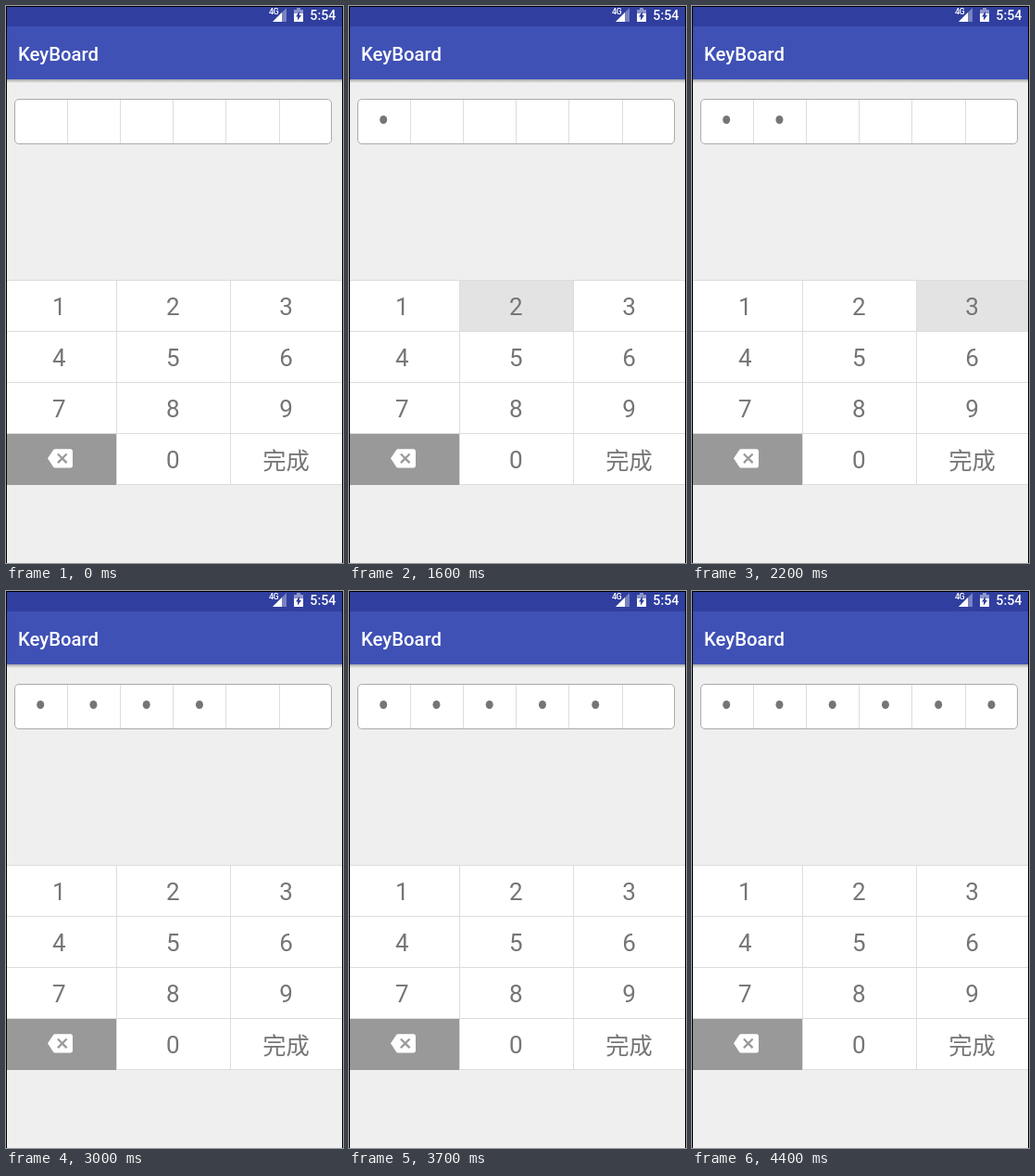
These frames come from a looping animation (364 by 600 pixels, 8000 ms). An HTML page:

```html
<!DOCTYPE html>
<html lang="en">
<head>
<meta charset="utf-8">
<title>Passcode keypad</title>
<style>
html, body { margin: 0; width: 100%; height: 100%; overflow: hidden; background: #efefef; }
svg { display: block; width: 364px; height: 600px; font-family: Roboto, sans-serif; }
.key { font-size: 26px; fill: #757575; text-anchor: middle; }
.cjk { font-size: 25.3px; font-family: "Noto Sans CJK SC", "Noto Sans CJK", sans-serif; }
.bar { font-weight: 500; fill: #fff; }
</style>
</head>
<body>
<svg viewBox="0 0 364 600">
  <defs>
    <linearGradient id="shade" x2="0" y2="1">
      <stop stop-color="#000" stop-opacity=".3"/>
      <stop offset="1" stop-color="#000" stop-opacity="0"/>
    </linearGradient>
  </defs>
  <rect width="364" height="600" fill="#efefef"/>
  <rect y="79" width="364" height="4" fill="url(#shade)"/>
  <rect width="364" height="79" fill="#3f51b5"/>
  <rect width="364" height="22" fill="#303f9f"/>

  <!-- status icons -->
  <path d="M303 2V17H288Z" fill="#fff" opacity=".35"/>
  <path d="M298 7V17H288Z" fill="#fff"/>
  <text x="284" y="9" font-size="9" letter-spacing="-.6" class="bar">4G</text>
  <path d="M314 2h4v2h3v5h-10v-5h3z" fill="#fff" opacity=".45"/>
  <path d="M311 8h10v9h-10z" fill="#fff"/>
  <path d="M315 15.5V11.4H313L317 5.7V9.9H319Z" fill="#303f9f"/>
  <text x="356.300" y="15.400" font-size="14.200" text-anchor="end" class="bar">5:54</text>
  <text x="13" y="59" font-size="20.300" class="bar">KeyBoard</text>

  <!-- passcode field -->
  <rect x="9.500" y="100.500" width="342" height="48" rx="4.500" fill="#fff" stroke="#aaa"/>
  <path d="M66.500 101V148M123.500 101V148M180.500 101V148M237.500 101V148M295.500 101V148" stroke="#ddd"/>
  <g id="dots" fill="#757575"></g>

  <!-- keypad -->
  <rect y="295" width="364" height="221" fill="#fff"/>
  <rect id="press" height="55" fill="#e3e3e3"/>
  <path d="M0 295.500H364M0 350.500H364M0 405.500H364M0 460.500H364M0 515.500H364M119.500 295V516M242.500 295V516" stroke="#ddd"/>
  <rect y="461" width="119" height="55" fill="#999"/>
  <g id="keys"></g>
  <path transform="translate(45 473.800) scale(1.125)" fill="#fff" d="M22 3H7c-.69 0-1.230.35-1.590.88L0 12l5.410 8.110c.36.53.9.89 1.590.89h15c1.100 0 2-.9 2-2V5c0-1.100-.9-2-2-2zm-3 12.590L17.590 17 14 13.410 10.410 17 9 15.590 12.590 12 9 8.410 10.410 7 14 10.590 17.590 7 19 8.410 15.410 12 19 15.590z"/>

  <path d="M.5 0V600M363.500 0V600M0 .5H364" stroke="#000"/>
</svg>
<script>
const LOOP = 8000;
const HOLD = 100;
const entered = [1300, 1700, 2300, 3000, 3700, 4400];
const presses = [[1200, 1], [1600, 2], [2200, 3], [3600, 5], [4300, 6]]; // [time, key]
const edges = [1, 119, 242, 363];
const centers = [57.2, 180.2, 302.6];

const byId = id => document.getElementById(id);
const rowTop = i => 295 + 55 * Math.floor(i / 3);

function add(parent, name, attrs, text = "") {
  const el = document.createElementNS("http://www.w3.org/2000/svg", name);
  for (const k in attrs) el.setAttribute(k, attrs[k]);
  el.textContent = text;
  parent.append(el);
  return el;
}

["1", "2", "3", "4", "5", "6", "7", "8", "9", "", "0", "完成"].forEach((label, i) => {
  const cjk = label.length > 1;
  add(byId("keys"), "text", {
    x: centers[i % 3],
    y: rowTop(i) + (cjk ? 39 : 38.3),
    class: cjk ? "key cjk" : "key"
  }, label);
});

const dots = entered.map((_, i) =>
  add(byId("dots"), "ellipse", { cx: 37.2 + 57.25 * i, cy: 122.5, rx: 4, ry: 4.5 }));
const press = byId("press");

function show(el, on) {
  el.setAttribute("visibility", on ? "visible" : "hidden");
}

function draw() {
  const t = performance.now() % LOOP;
  dots.forEach((dot, i) => show(dot, t >= entered[i]));
  const hit = presses.find(([at]) => t >= at && t < at + HOLD);
  show(press, hit);
  if (hit) {
    const i = hit[1] - 1, col = i % 3;
    press.setAttribute("x", edges[col]);
    press.setAttribute("y", rowTop(i));
    press.setAttribute("width", edges[col + 1] - edges[col]);
  }
  requestAnimationFrame(draw);
}
draw();
</script>
</body>
</html>
```
